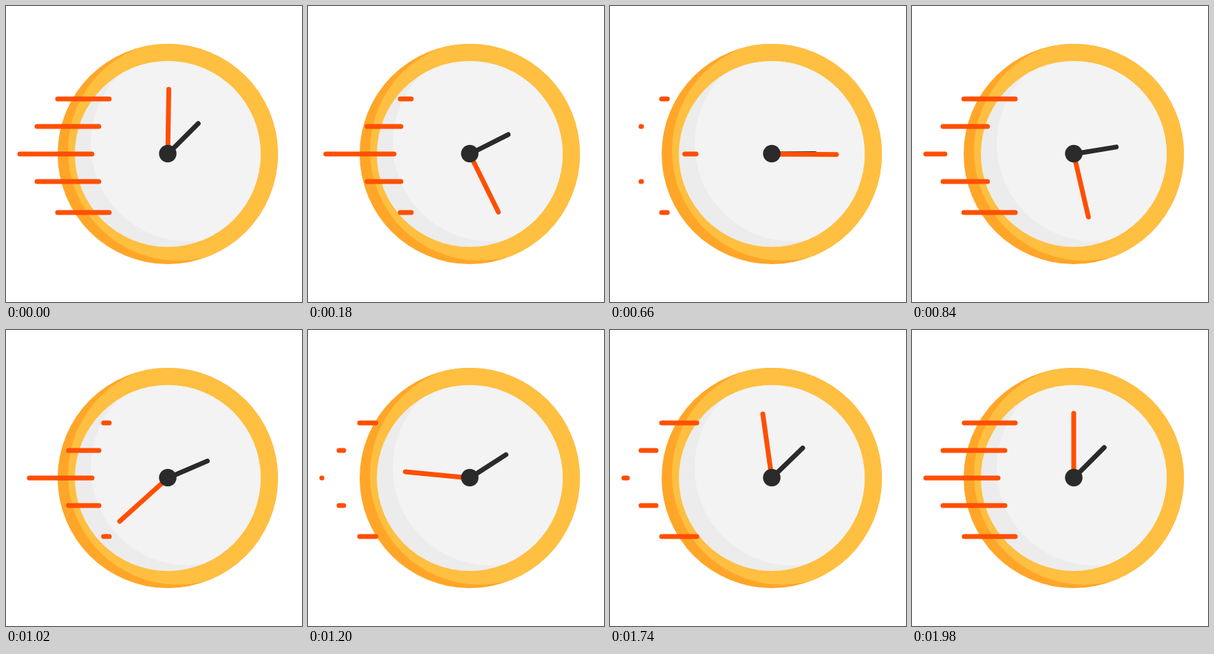
Write an HTML page with a canvas that moves like this. It is 430 px wide and 430 px high and loops after 2000 ms.

```html
<!DOCTYPE html>
<html lang="en">
<head>
<meta charset="utf-8">
<title>Fast clock</title>
<style>
html, body { margin: 0; height: 100%; overflow: hidden; background: #fff; }
canvas { display: block; }
</style>
</head>
<body>
<canvas width="430" height="430"></canvas>
<script>
const ctx = document.querySelector('canvas').getContext('2d');
const LOOP = 2000, TAU = Math.PI * 2, CX = 235, CY = 215;
const ORANGE = '#ff4f00', DARK = '#2a2a2a';

// Cubic Bezier easing, solved for x by bisection
function bezier(x1, y1, x2, y2) {
  const at = (a, b, s) => 3 * a * s * (1 - s) ** 2 + 3 * b * s * s * (1 - s) + s ** 3;
  return x => {
    if (x <= 0) return 0;
    if (x >= 1) return 1;
    let lo = 0, hi = 1;
    for (let i = 0; i < 24; i++) {
      const mid = (lo + hi) / 2;
      if (at(x1, x2, mid) < x) lo = mid; else hi = mid;
    }
    return at(y1, y2, lo);
  };
}

const spin = bezier(.2, .51, .49, 1);
const swingUp = bezier(.33, .1, .3, 1);
const swingBack = bezier(.25, .03, .2, 1);
const retract = bezier(.3, .05, .3, 1);
const extend = bezier(.4, .3, .65, .9);

// Streaks: y, left end, right end, stagger step
const STREAKS = [
  [135, 75, 150, 2], [175, 45, 135, 1], [215, 20, 125, 0],
  [255, 45, 135, 1], [300, 75, 150, 2]
];
const PERIOD = LOOP / 7, RETRACT = .57, TURN = 610;

function disc(x, y, r, color) {
  ctx.fillStyle = color;
  ctx.beginPath();
  ctx.arc(x, y, r, 0, TAU);
  ctx.fill();
}

// A disc with a lighter disc clipped inside it, leaving a shaded crescent
function shadedDisc(r, shade, light, lx, ly, lr) {
  disc(CX, CY, r, shade);
  ctx.save();
  ctx.beginPath();
  ctx.arc(CX, CY, r, 0, TAU);
  ctx.clip();
  disc(lx, ly, lr, light);
  ctx.restore();
}

function line(x1, y1, x2, y2, color) {
  ctx.strokeStyle = color;
  ctx.beginPath();
  ctx.moveTo(x1, y1);
  ctx.lineTo(x2, y2);
  ctx.stroke();
}

function hand(degrees, length, color) {
  const a = degrees * TAU / 360;
  line(CX, CY, CX + length * Math.sin(a), CY - length * Math.cos(a), color);
}

function streak(t, [y, left, right, step]) {
  const first = 191 + 40 * step;   // end of the shorter opening cycle
  let q = t < first ? t / first : (t - first) / PERIOD;
  q = q >= 6 ? 1 : q % 1;          // rest at full length after the last cycle
  const size = right - left;
  let a = left, b = right;
  if (q < RETRACT) b -= size * retract(q / RETRACT);
  else a = right - size * extend((q - RETRACT) / (1 - RETRACT));
  if (b - a > .05) line(a, y, b, y, ORANGE);
}

function draw(now) {
  const t = now % LOOP;
  ctx.fillStyle = '#fff';
  ctx.fillRect(0, 0, 430, 430);
  shadedDisc(160, '#ffa629', '#ffbf40', 250, 210, 160);
  shadedDisc(135, '#ececec', '#f3f3f3', 265, 200, 142);

  ctx.lineWidth = 7;
  ctx.lineCap = 'round';
  STREAKS.forEach(s => streak(t, s));

  const swing = t < TURN ? swingUp(t / TURN) : 1 - swingBack((t - TURN) / (LOOP - TURN));
  hand(45 + 45 * swing, 62.5, DARK);
  hand(720 * spin(t / LOOP), 94, ORANGE);
  disc(CX, 214.5, 12.7, DARK);
}

const start = performance.now();
function tick() {
  draw(performance.now() - start);
  requestAnimationFrame(tick);
}
tick();
</script>
</body>
</html>
```
